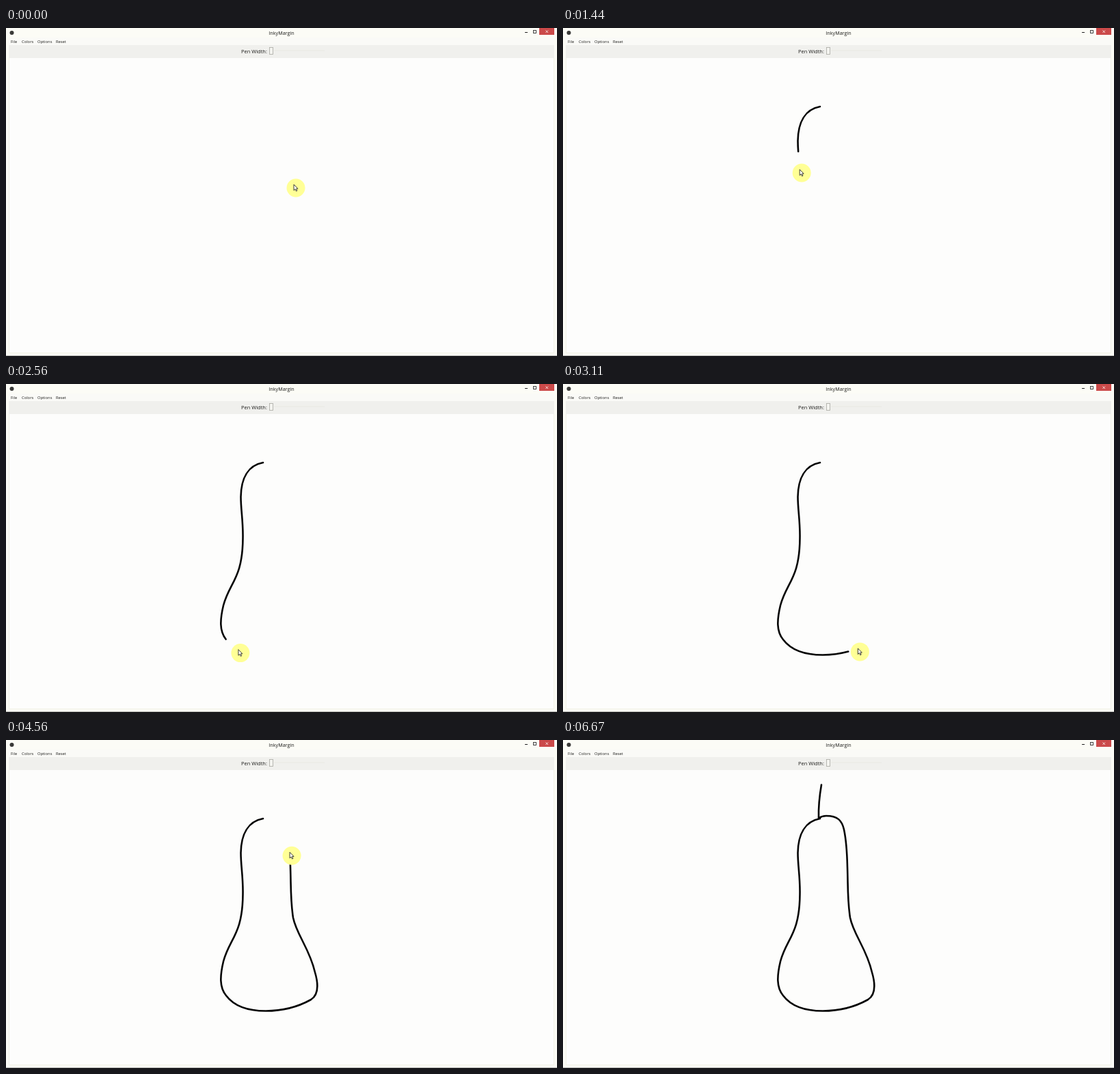
These frames come from a looping animation (806x480 px, 8000 ms). An HTML page:

```html
<!DOCTYPE html>
<html lang="en">
<head>
<meta charset="utf-8">
<title>Drawing a pear</title>
<style>
  html, body { margin: 0; width: 100%; height: 100%; overflow: hidden; background: #fcfcf8; }
  svg { display: block; width: 806px; height: 480px; }
  text { font-family: "Open Sans", "Noto Sans", sans-serif; fill: #1c1c1a; }
  .menu { font-size: 5.8px; }
  .ink { fill: none; stroke: #050505; stroke-width: 2.6; stroke-linecap: round; stroke-linejoin: round; }
</style>
</head>
<body>
<svg viewBox="0 0 806 480">
  <!-- window -->
  <rect width="806" height="480" fill="#fcfcf6"/>
  <rect x="4" y="14" width="798" height="11" fill="#fafaf7"/>
  <rect x="4" y="25" width="798" height="19" fill="#f0f0ed"/>
  <rect x="4" y="44" width="798" height="432" fill="#fdfdfc"/>
  <path d="M4.5 44V475.5H801.5V44" fill="none" stroke="#f2f2e6"/>
  <path d="M0 479.5H806" stroke="#bcbcb8"/>

  <!-- title bar -->
  <circle cx="8.5" cy="7" r="3" fill="#3a3a38"/>
  <text x="403" y="10.2" font-size="7.2" text-anchor="middle">InkyMargin</text>
  <path d="M759 6.5H763" stroke="#222"/>
  <rect x="771.5" y="3.5" width="4" height="4" fill="none" stroke="#333" stroke-width=".9"/>
  <rect x="780" width="22" height="10" fill="#cb4a4a"/>
  <path d="M789.5 3.5L793 7M793 3.5L789.5 7" stroke="#f6dcd8"/>

  <!-- menu and pen width -->
  <g class="menu">
    <text x="7" y="22">File</text>
    <text x="23" y="22">Colors</text>
    <text x="46" y="22">Options</text>
    <text x="73" y="22">Reset</text>
  </g>
  <text x="344" y="36.5" font-size="7.5">Pen Width:</text>
  <path d="M392 33H466" stroke="#e8e8e2"/>
  <rect x="385.5" y="28.5" width="5" height="10" fill="#f4f4f0" stroke="#b0b0aa" stroke-width=".9"/>

  <!-- drawing -->
  <path id="body" class="ink" d="M376 115C354 119 344 138 343.5 165
    C343.5 185 347 200 346.5 226C346 285 327 290 318 324
    C313 345 312 362 322 374C334 390 355 396.5 380 396.5
    S428 390 446 380C457 373 457 357 452 340
    C444 305 425 285 420 260C416 235 417 215 416 186
    C415.5 165 414 145 411 131C408 118 402 111 385 111Q379 111 374 114.5"/>
  <path id="stem" class="ink" d="M374 114C373.5 95 375.5 80 378 65.5"/>
  <g id="cursor">
    <circle cx="3" cy="5" r="13.5" fill="#ffff96"/>
    <path d="M0 0V8.6L2 6.8L3.4 9.8L4.8 9.2L3.5 6.2H6Z" fill="#fffff4" stroke="#2a2a24" stroke-width=".9"/>
  </g>
</svg>
<script>
const LOOP = 8000;
const TICK = 1000 / 9;

// Hand speed: [tick, pixels drawn], even in between.
const strokes = [
  { id: "body", keys: [[8, 0], [10, 28], [13, 107], [19, 250], [22, 280],
                       [25, 352], [31, 443], [33, 505], [43, 672], [47, 720]] },
  { id: "stem", keys: [[53, 0], [55, 24], [59, 49]] }
];

for (const stroke of strokes) {
  stroke.path = document.getElementById(stroke.id);
  stroke.length = stroke.path.getTotalLength();
  stroke.start = stroke.keys[0][0];
  [stroke.end, stroke.drawn] = stroke.keys.at(-1);
}
const cursor = document.getElementById("cursor");

function lengthAt({ keys, start, end, drawn, length }, tick) {
  if (tick <= start) return 0;
  if (tick >= end) return length;
  const i = keys.findIndex(([t]) => t > tick);
  const [[t0, d0], [t1, d1]] = [keys[i - 1], keys[i]];
  return (d0 + (d1 - d0) * (tick - t0) / (t1 - t0)) / drawn * length;
}

function render(tick) {
  let tip = tick <= strokes[0].start ? { x: 421, y: 229 } : null;
  for (const stroke of strokes) {
    const { path, length, start, end } = stroke;
    // The ink trails the pointer by one tick.
    const ink = lengthAt(stroke, tick - 1);
    path.style.strokeDasharray = `${ink} ${length + 9}`;
    path.style.visibility = ink ? "visible" : "hidden";
    if (tick > start && tick <= end) tip = path.getPointAtLength(lengthAt(stroke, tick));
  }
  cursor.style.visibility = tip ? "visible" : "hidden";
  if (tip) cursor.setAttribute("transform", `translate(${tip.x} ${tip.y})`);
}

function frame() {
  let tick = Math.floor((performance.now() % LOOP + 5) / TICK) % Math.round(LOOP / TICK);
  if (tick % 6 === 2) tick--;
  render(tick);
  requestAnimationFrame(frame);
}
frame();
</script>
</body>
</html>
```
